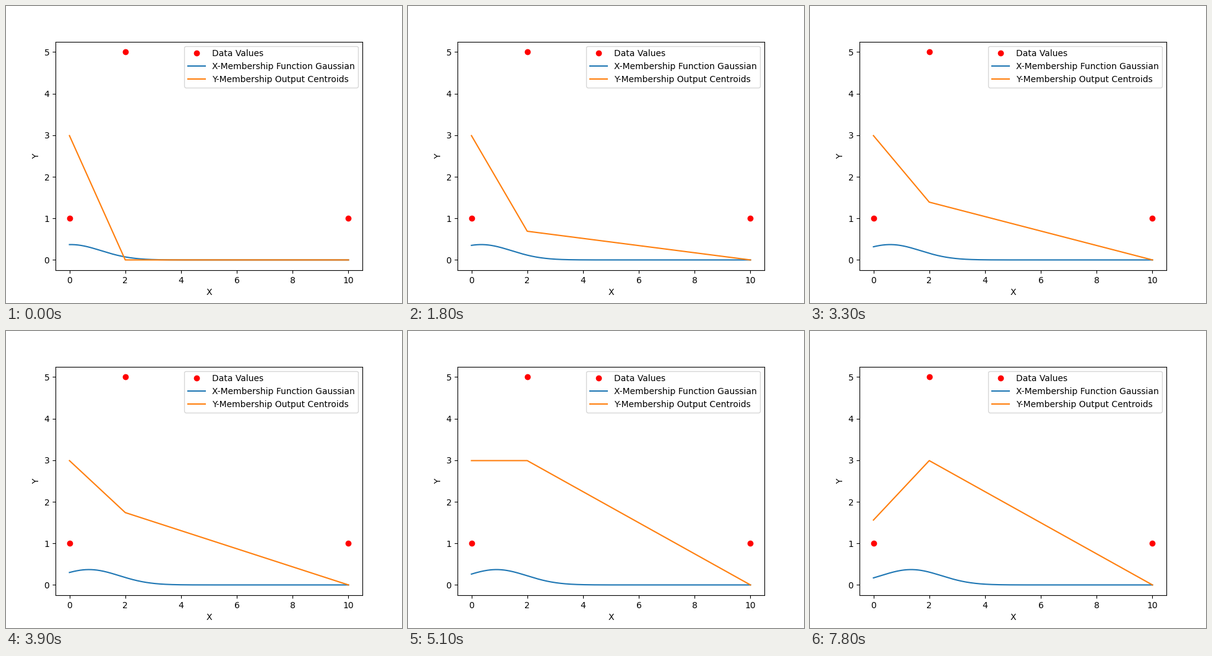
Animation, 640 px wide and 480 px high, one loop 8000 ms. Source, as a matplotlib script:

```python
import numpy as np
import matplotlib.pyplot as plt
from matplotlib.animation import FuncAnimation

TICK_MS = 100          # animation resolution
TICKS_PER_STEP = 3     # the Gaussian moves every 300 ms
TICKS = 80

data_x = np.array([0, 2, 10])
data_y = np.array([1, 5, 1])
sigma_x = data_x.std() / 4
mean_y, sigma_y = 2.774, 1.93

xs = np.linspace(0, 10, 500)
outputs = np.arange(0, 3, 0.01)


def gaussian(v, mean, sigma):
    return np.exp(-((v - mean) / sigma) ** 2 / 2) / (sigma * np.sqrt(2 * np.pi))


def output_for(membership):
    """Lowest output reaching the membership, or the top of the range."""
    reached = gaussian(outputs, mean_y, sigma_y) >= membership
    return outputs[reached.argmax()] if reached.any() else outputs[-1]


fig, ax = plt.subplots(figsize=(6.4, 4.8), dpi=100)
ax.plot(data_x, data_y, "ro", label="Data Values")
x_curve, = ax.plot([], [], label="X-Membership Function Gaussian")
y_curve, = ax.plot([], [], label="Y-Membership Output Centroids")
ax.set(xlim=(-0.5, 10.5), ylim=(-0.25, 5.25), xlabel="X", ylabel="Y")
ax.set_xticks(range(0, 11, 2))
ax.set_yticks(range(6))
ax.legend(loc="upper right")


def update(tick):
    center = 0.05 * (tick // TICKS_PER_STEP + 1)
    x_curve.set_data(xs, gaussian(xs, center, sigma_x))
    y_curve.set_data(data_x, [output_for(gaussian(x, center, sigma_x)) for x in data_x])
    return x_curve, y_curve


anim = FuncAnimation(fig, update, frames=TICKS, interval=TICK_MS,
                     repeat=True, repeat_delay=0)
plt.show()
```
